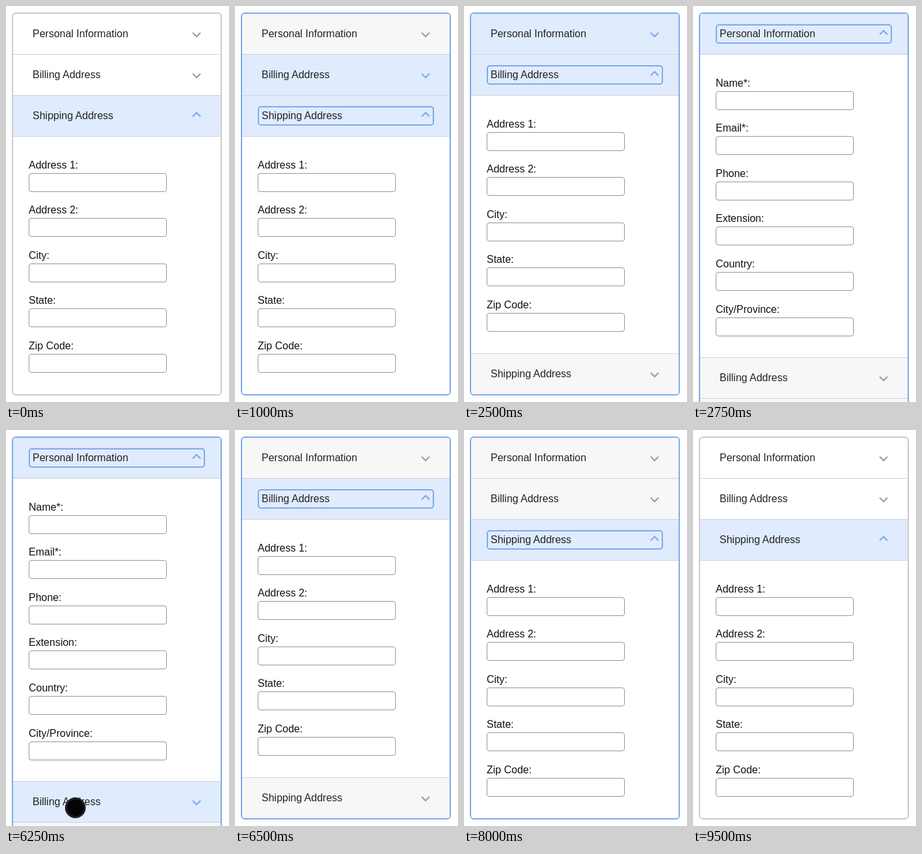
Recreate the animation shown at these times as an HTML page. Size 344 by 609 pixels, loop 9750 ms.

```html
<!DOCTYPE html>
<html lang="en">
<head>
<meta charset="utf-8">
<title>Accordion form</title>
<style>
html, body { margin: 0; width: 100%; height: 100%; overflow: hidden; background: #fff; }
body { position: relative; font: 16px/18px Arial, "Liberation Sans", sans-serif; color: #111; }
.box { position: absolute; left: 9px; top: 10px; width: 320px; border: 2px solid #ccc; border-radius: 6px; overflow: hidden; background: #fff; }
.box.active { border-color: #7babea; }
.head { position: relative; height: 62px; border-bottom: 1px solid #d0d2d6; color: #222; }
.head:last-child { border-bottom: 0; }
.active .head { background: #f7f7f7; }
.box .head.blue { background: #e0ebfe; }
.head span { position: absolute; left: 30px; top: 22px; }
.head svg { position: absolute; left: 276px; top: 27px; fill: none; stroke: #9c9c9c; stroke-width: 2.2; }
.head.blue svg { stroke: #7babea; }
.head.open svg { top: 24px; transform: scaleY(-1); }
.head.focus::after { content: ""; position: absolute; left: 24px; top: 16px; width: 268px; height: 26px; border: 2px solid #7babea; border-radius: 5px; }
.panel { position: relative; border-bottom: 1px solid #d0d2d6; box-sizing: border-box; background: #fff; }
.panel:last-child { border-bottom: 0; }
.panel label, .panel i { position: absolute; left: 24px; }
.panel i { width: 211px; height: 27px; border: 1px solid #969696; border-radius: 4px; background: #fff; }
.dot { position: absolute; left: 91px; top: 565px; width: 26px; height: 26px; border: 3px solid #222; border-radius: 50%; background: #050505; }
</style>
</head>
<body>
<script>
const address = ["Address 1:", "Address 2:", "City:", "State:", "Zip Code:"];
const sections = [
  { title: "Personal Information", height: 466,
    fields: ["Name*:", "Email*:", "Phone:", "Extension:", "Country:", "City/Province:"] },
  { title: "Billing Address", height: 397, fields: address },
  { title: "Shipping Address", height: 396, fields: address }
];
const PERSONAL = 0, BILLING = 1, SHIPPING = 2, NONE = -1;
const LOOP = 9750, PITCH = 69.6;

// start time, open section, hovered section, widget has focus, pointer pressed
const steps = [
  [0, SHIPPING, NONE, false, false],
  [1000, SHIPPING, BILLING, true, false],
  [1250, BILLING, BILLING, true, false],
  [2500, BILLING, PERSONAL, true, false],
  [2750, PERSONAL, PERSONAL, true, false],
  [6250, PERSONAL, BILLING, true, true],
  [6500, BILLING, NONE, true, false],
  [7750, BILLING, SHIPPING, true, false],
  [8000, SHIPPING, SHIPPING, true, false],
  [9500, SHIPPING, NONE, false, false]
];

function add(parent, tag, className = "", text = "") {
  const el = document.createElement(tag);
  el.className = className;
  el.textContent = text;
  return parent.appendChild(el);
}

function addHead(box, title, open, hover, active) {
  const names = ["head"];
  if (open || hover) names.push("blue");
  if (open) names.push("open");
  if (open && active) names.push("focus");
  const head = add(box, "div", names.join(" "));
  add(head, "span", "", title);
  head.insertAdjacentHTML("beforeend",
    '<svg width="14" height="10"><path d="M1 2L7 8L13 2"/></svg>');
}

function addPanel(box, { fields, height }) {
  const panel = add(box, "div", "panel");
  panel.style.height = height + "px";
  fields.forEach((name, i) => {
    const y = Math.floor(i * PITCH);
    add(panel, "label", "", name).style.top = 35 + y + "px";
    add(panel, "i").style.top = 56 + y + "px";
  });
}

function buildScene([, open, hover, active, pressed]) {
  const scene = add(document.body, "div");
  const box = add(scene, "div", active ? "box active" : "box");
  sections.forEach((section, i) => {
    addHead(box, section.title, i === open, i === hover, active);
    if (i === open) addPanel(box, section);
  });
  if (pressed) add(scene, "div", "dot");
  scene.hidden = true;
  return scene;
}

const scenes = steps.map(buildScene);
const start = performance.now();
let shown = -1;

function draw(now) {
  const t = Math.max(0, now - start) % LOOP;
  const index = steps.filter(step => step[0] <= t).length - 1;
  if (index !== shown) {
    scenes.forEach((scene, i) => { scene.hidden = i !== index; });
    shown = index;
  }
  requestAnimationFrame(draw);
}
draw(start);
</script>
</body>
</html>
```
